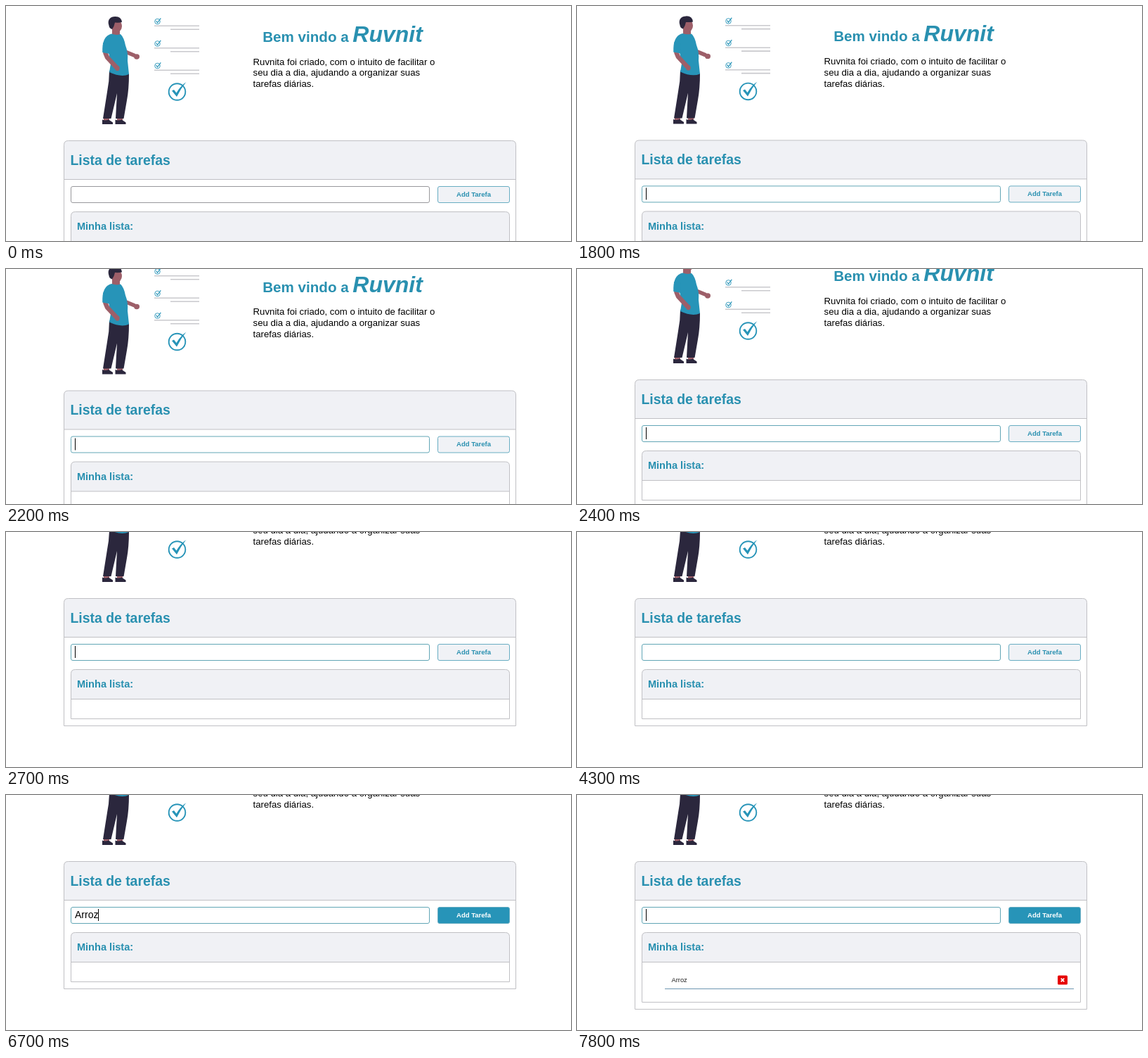
Recreate the animation shown at these times as an HTML page. Size 804 by 334 pixels, loop 8000 ms.

```html
<!DOCTYPE html>
<html lang="pt">
<head>
<meta charset="utf-8">
<title>Lista de tarefas</title>
<style>
  html, body { margin: 0; width: 100%; height: 100%; overflow: hidden; background: #fff; }
  svg { display: block; font-family: "Liberation Sans", Arial, sans-serif; }
  .accent { fill: #2990b0; font-weight: bold; }
  .panel { fill: #f0f1f5; }
  .frame { fill: none; stroke: #c0c0c4; }
  .ink { fill: #2b273d; }
  .skin { fill: #9d5f69; }
  .arm { fill: none; stroke: #9d5f69; stroke-linecap: round; stroke-linejoin: round; }
  .shirt { fill: #2794b8; }
  .tick { fill: none; stroke: #2794b8; }
  .rule { fill: none; stroke: #c9c9cd; stroke-width: 1.6; }
</style>
</head>
<body>
<svg width="804" height="334" viewBox="0 0 804 334">
  <defs>
    <g id="entry">
      <circle class="tick" cx="215.5" cy="22" r="3.8" stroke-width=".9"/>
      <path class="tick" d="M213.5 21l2 2.800 4.800-6.500" stroke-width="1.200"/>
      <path class="rule" d="M211 28.300h64M234 33.200h41"/>
    </g>
  </defs>
  <g id="page">
    <g id="person">
      <path class="skin" d="M139 157h8v8h-8zM158 157h8v8h-8z"/>
      <path class="ink" d="M147 92L175 96Q175 118 172 134L167.500 160H156L158 124 149.500 160H138L144 122Q147 107 147 92z"/>
      <path class="ink" d="M137 161.500q4 2 9 0l6 4v2.500h-15zM155.500 161.500q4 2 9 0l6 4v2.500h-15z"/>
      <path class="skin" d="M151 30h11v12q-6 3-11 0z"/>
      <ellipse class="skin" cx="157.500" cy="28.500" rx="7.500" ry="9"/>
      <path class="ink" d="M146.500 28C143.500 19 149 15 155 15Q164 14.500 165 23Q161 24 155 23.500Q154 29 151 33Q147 32 146.500 28z"/>
      <path class="arm" d="M165 63L182 70" stroke-width="5.500"/>
      <ellipse class="skin" cx="186" cy="72" rx="4" ry="3.700"/>
      <path class="shirt" d="M150 39.500Q157 42 163 40Q168 45 170 56Q174 66 173 78L175 97Q164 102 147 94L149 82 146 66 137.500 66Q136 43 150 39.500z"/>
      <path class="arm" d="M141.500 67L144 73 157 87" stroke-width="6.500"/>
      <ellipse class="skin" cx="158.500" cy="88.500" rx="3.200" ry="3.700"/>
      <path class="shirt" d="M138 52L148 54 147.500 68 137.500 66z"/>
    </g>
    <use href="#entry"/>
    <use href="#entry" y="31.500"/>
    <use href="#entry" y="63"/>
    <circle class="tick" cx="243.500" cy="122" r="11.800" stroke-width="1.900"/>
    <path class="shirt" d="M236 120.500l3-1.500 3.500 4.500Q248 114 256.500 108Q249 117 243 129z"/>

    <text class="accent" x="365.200" y="51" font-size="20.600">Bem vindo a <tspan font-size="32" font-style="italic">Ruvnit</tspan></text>
    <g font-size="13.200">
      <text x="351.600" y="83.600">Ruvnita foi criado, com o intuito de facilitar o</text>
      <text x="351.600" y="99.400">seu dia a dia, ajudando a organizar suas</text>
      <text x="351.600" y="115.200">tarefas diárias.</text>
    </g>

    <path class="panel" d="M82.500 246.500v-49q0-6 6-6h631q6 0 6 6v49z"/>
    <path class="frame" id="outer"/>
    <text class="accent" x="91.500" y="225.700" font-size="19.400">Lista de tarefas</text>

    <rect id="field" x="92.500" y="256.500" width="510" height="23" rx="2.500" fill="#fff"/>
    <text id="typed" x="98" y="272" font-size="14"></text>
    <rect id="caret" y="259" width="1" height="17"/>
    <rect id="button" x="614.500" y="256.500" width="102" height="23" rx="2.500" stroke="#68adc2"/>
    <text id="label" x="665.500" y="270.800" font-size="9.500" font-weight="bold" text-anchor="middle">Add Tarefa</text>

    <path class="panel" d="M92.500 334.500v-36q0-6 6-6h612q6 0 6 6v36z"/>
    <path class="frame" id="inner"/>
    <text class="accent" x="100.900" y="318.300" font-size="14.600">Minha lista:</text>

    <g id="item">
      <text x="134.500" y="362.500" font-size="9.300" fill="#222">Arroz</text>
      <path d="M125 372.500h582" stroke="#6f97b1"/>
      <rect x="684" y="353.500" width="14" height="13" rx="1.500" fill="#e60000"/>
      <path d="M688.700 357.700l4.600 4.600m0-4.600l-4.600 4.600" stroke="#fff" stroke-width="1.700"/>
    </g>
  </g>
</svg>
<script>
  const LOOP = 8000;
  // Each table holds [start in ms, value] steps.
  const steps = {
    scroll: [[0, 0], [1800, .6], [1900, 3], [2000, 7], [2100, 12], [2200, 18.5],
             [2300, 26], [2400, 34], [2500, 55], [2600, 81], [2700, 97]],
    caret: [[0, 0], [1700, 1], [3300, 0], [3800, 1], [4300, 0], [4800, 1],
            [6000, 0], [6500, 1], [7100, 0], [7600, 1]],
    text: [[0, ""], [4900, "A"], [5200, "Ar"], [5300, "Arr"], [5400, "Arro"],
           [5500, "Arroz"], [7700, ""]],
    hover: [[0, 0], [6500, .3], [6600, .75], [6700, 1]],
    added: [[0, 0], [7700, 1]]
  };
  const el = id => document.getElementById(id);
  const [page, outer, inner, field, typed, caret, button, label, item] =
    ["page", "outer", "inner", "field", "typed", "caret", "button", "label", "item"].map(el);
  const valueAt = (table, t) => table.findLast(([start]) => t >= start)[1];
  const mix = (from, to, k) => `rgb(${from.map((c, i) => Math.round(c + (to[i] - c) * k))})`;
  const show = (node, on) => node.setAttribute("visibility", on ? "visible" : "hidden");

  // Box with rounded top corners, square bottom corners and a line under its header.
  const card = (x, right, top, divider, bottom) =>
    `M${x} ${bottom}V${top + 6}q0-6 6-6H${right - 6}q6 0 6 6V${bottom}zM${x} ${divider}H${right}`;

  function render(t) {
    const now = name => valueAt(steps[name], t);
    const grow = now("added") * 29;
    const hover = now("hover");
    page.setAttribute("transform", `translate(0 ${-now("scroll")})`);
    outer.setAttribute("d", card(82.5, 725.5, 191.5, 246.5, 372.5 + grow));
    inner.setAttribute("d", card(92.5, 716.5, 292.5, 334.5, 362.5 + grow));
    field.setAttribute("stroke", t < 1700 ? "#98989c" : "#62a6b6");
    typed.textContent = now("text");
    caret.setAttribute("x", Math.round(98 + typed.getComputedTextLength()));
    show(caret, now("caret"));
    button.setAttribute("fill", mix([240, 242, 246], [39, 148, 184], hover));
    label.setAttribute("fill", mix([41, 144, 176], [255, 255, 255], hover));
    show(item, now("added"));
  }

  function tick() {
    render(performance.now() % LOOP);
    requestAnimationFrame(tick);
  }
  tick();
</script>
</body>
</html>
```
